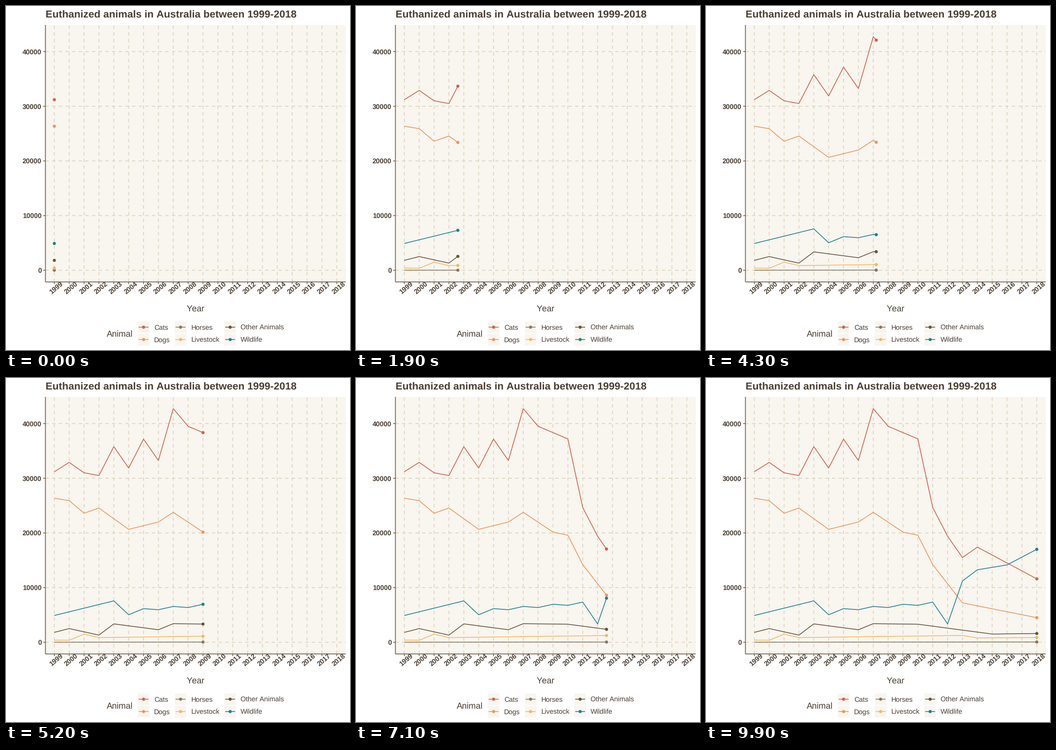
A matplotlib script for the animation above (10000 ms loop, 748 by 748 pixels).

```python
import numpy as np
import matplotlib.pyplot as plt
from matplotlib.animation import FuncAnimation
from matplotlib.patches import Circle, Rectangle

plt.rcParams.update({
    "font.family": "Liberation Sans",
    "text.hinting": "none",
    "text.kerning_factor": 6,  # plain advances, practically no kerning
    "path.snap": False,
})

SIZE, DPI = 748, 100
FRAMES, INTERVAL = 100, 100
PT = 72 / DPI  # points per pixel

TEXT, AXIS, GRID, PANEL = "#493e32", "#7a6751", "#dcd5c1", "#f9f5ef"
SMALL, MEDIUM, LARGE = 14.93, 18.67, 22.4
THICK, THIN, RADIUS = 1.81, 1.65, 3.4
LEFT, RIGHT, TOP, BOTTOM = 85.7, 738.67, 41.1, 600.0
FIRST, LAST = 1999, 2018
STEP = (RIGHT - LEFT) / (LAST - FIRST + 1.2)
ZERO, UNIT = 574.6, 11.887  # pixel row of zero, pixels per thousand

INDEX = np.arange(LAST - FIRST + 1)


def trend(*points, zigzag=0, start=0, stop=0):
    """Straight runs between turning points, with an optional yearly zigzag."""
    values = np.interp(INDEX, *zip(*points))
    span = (INDEX >= start) & (INDEX <= stop)
    return values + span * zigzag * (-1.0) ** INDEX


# Turning points: (years after the first, thousands of animals)
SERIES = {
    "Cats": ("#d2604a", trend(
        (0, 31.2), (1, 32.9), (2, 31), (3, 32.8), (7, 35.55), (8, 42.74),
        (9, 39.5), (11, 37.2), (12, 24.65), (13, 19.4), (14, 15.5),
        (15, 17.4), (19, 11.6), zigzag=2.3, start=3, stop=7)),
    "Dogs": ("#eb975b", trend(
        (0, 26.35), (1, 25.9), (2, 23.6), (3, 24.55), (5, 20.65), (7, 22),
        (8, 23.77), (10, 20.15), (11, 19.58), (12, 14.2), (14, 7.2),
        (19, 4.5))),
    "Horses": ("#887763", trend((0, 0.01), (19, 0.05))),
    "Livestock": ("#f0b868", trend(
        (0, 0.4), (1, 0.36), (2, 1.48), (3, 0.85), (14, 1.25), (15, 0.78),
        (19, 0.87))),
    "Other Animals": ("#675441", trend(
        (0, 1.81), (1, 2.5), (3, 1.31), (4, 3.36), (7, 2.29), (8, 3.4),
        (11, 3.3), (16, 1.5), (19, 1.6))),
    "Wildlife": ("#1f7f91", trend(
        (0, 4.9), (4, 7.57), (5, 5.03), (6, 5.95), (12, 7.15), (13, 3.35),
        (14, 11.21), (15, 13.25), (17, 14.15), (19, 17),
        zigzag=0.2, start=6, stop=12)),
}

fig = plt.figure(figsize=(SIZE / DPI, SIZE / DPI), dpi=DPI, facecolor="white")
ax = fig.add_axes([0, 0, 1, 1])
ax.set_xlim(0, SIZE)
ax.set_ylim(SIZE, 0)
ax.axis("off")


def px(i):
    return LEFT + (0.6 + np.asarray(i)) * STEP


def py(thousands):
    return ZERO - np.asarray(thousands) * UNIT


def line(xs, ys, color, width, z, **kw):
    kw = {"solid_capstyle": "butt", "solid_joinstyle": "round", **kw}
    return ax.plot(xs, ys, color=color, lw=width * PT, zorder=z, **kw)[0]


def label(x, y, text, size, **kw):
    ax.text(x, y, text, fontsize=size * PT, color=TEXT, va="baseline",
            zorder=9, **kw)


def dot(x, y, color, z):
    return ax.add_patch(Circle((x, y), RADIUS, fc=color, lw=0, zorder=z))


def draw_panel():
    ax.add_patch(Rectangle((LEFT, TOP), RIGHT - LEFT, BOTTOM - TOP,
                           fc=PANEL, lw=0, zorder=0))
    dashed = {"ls": (0, (4, 4))}
    for v in range(0, 50, 10):
        y = py(v)
        line([LEFT, RIGHT], [y, y], GRID, THICK, 1, **dashed)
        line([LEFT - 4.67, LEFT], [y, y], AXIS, THICK, 6)
        label(LEFT - 8.4, y + 5.35, str(v * 1000), SMALL, ha="right",
              weight="bold")
    for i in INDEX:
        x = px(i)
        line([x, x], [BOTTOM, TOP], GRID, THICK, 1, **dashed)
        line([x, x], [BOTTOM, BOTTOM + 4.67], AXIS, THICK, 6)
        label(x + 6.9, BOTTOM + 16.7, str(FIRST + i), SMALL, ha="center",
              weight="bold", rotation=40, rotation_mode="anchor")
    line([LEFT, LEFT], [TOP, BOTTOM], AXIS, THICK, 6)
    line([LEFT, RIGHT], [BOTTOM, BOTTOM], AXIS, THICK, 6)
    label(LEFT, 25.6, f"Euthanized animals in Australia between {FIRST}-{LAST}",
          LARGE, weight="bold")
    label((LEFT + RIGHT) / 2, 663.7, "Year", MEDIUM, ha="center")


def draw_legend():
    label(219.2, 719, "Animal", MEDIUM)
    half = 13.44
    for i, (name, (color, _)) in enumerate(SERIES.items()):
        x = (299.2, 379.6, 487.4)[i // 2]
        y = 698.4 + i % 2 * 2 * half
        ax.add_patch(Rectangle((x - half, y - half), 2 * half, 2 * half,
                               fc=PANEL, ec="white", lw=THICK * PT, zorder=0))
        line([x - 0.8 * half, x + 0.8 * half], [y, y], color, THIN, 4)
        dot(x, y, color, 5)
        label(x + half + 9.33, y + 5.35, name, SMALL)


draw_panel()
draw_legend()

# Each year is reached on a whole frame; motion is linear in between.
arrival = np.round(INDEX * (FRAMES - 1) / INDEX[-1])
tracks = [(py(values), line([], [], color, THIN, 4), dot(0, 0, color, 5))
          for color, values in SERIES.values()]


def update(frame):
    now = np.interp(frame, arrival, INDEX)
    t = np.append(INDEX[INDEX < now], now)
    for ys, path, head in tracks:
        y = np.interp(t, INDEX, ys)
        path.set_data(px(t), y)
        head.center = (px(now), y[-1])
    return [artist for track in tracks for artist in track[1:]]


anim = FuncAnimation(fig, update, frames=FRAMES, interval=INTERVAL,
                     repeat=True, repeat_delay=0)
plt.show()
```
